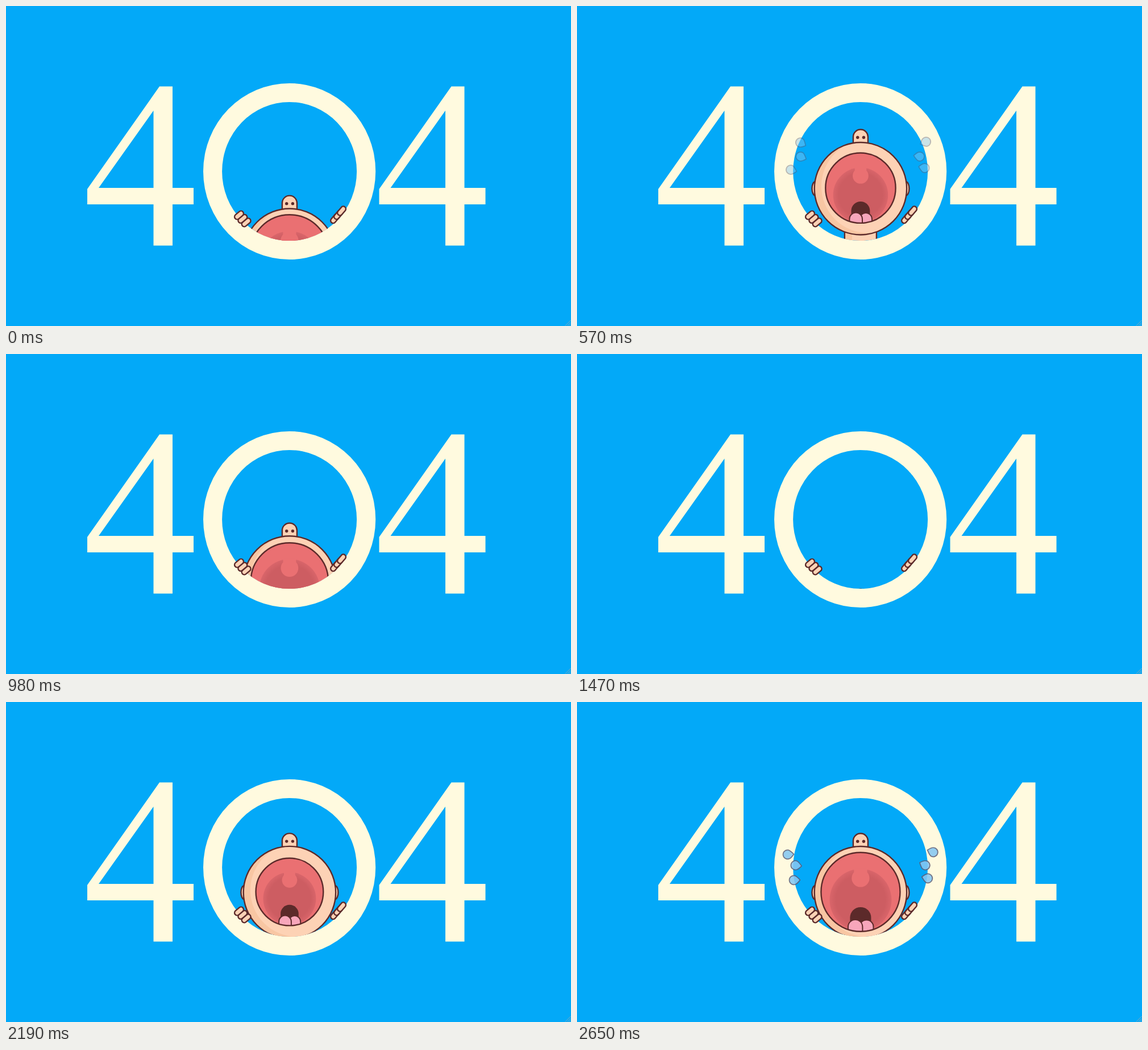
These frames come from a looping animation (994 by 563 pixels, 2.73 s). An HTML page:

```html
<!DOCTYPE html>
<html lang="en">
<head>
<meta charset="utf-8">
<title>404</title>
<style>
  html, body { margin: 0; height: 100%; overflow: hidden; background: #03a9f8; }
  svg { display: block; width: 100vw; height: 100vh; }
  .line { stroke: #5c2a2a; stroke-width: 2.4; }
  .skin { fill: #fdd2b5; }
  .shade { fill: #f8c6a3; }
  .mouth * { vector-effect: non-scaling-stroke; }
</style>
</head>
<body>
<svg viewBox="0 0 994 563" role="img" aria-label="404">
  <defs>
    <clipPath id="hole"><ellipse cx="498.6" cy="291" rx="118.5" ry="122"/></clipPath>
    <clipPath id="face"><circle r="81"/></clipPath>
    <clipPath id="lips"><circle r="60"/></clipPath>
    <radialGradient id="throat">
      <stop offset=".8" stop-color="#cd5d62"/>
      <stop offset="1" stop-color="#d9656a"/>
    </radialGradient>
    <path id="four" fill-rule="evenodd" d="M270 141.500H293V320H330V349H293V421.500H259.500V349H143V322ZM259.500 184L163 320H259.500Z"/>
    <rect id="finger" class="skin line" x="-9" y="-4.500" width="18" height="9" rx="4.500" stroke-width="2"/>
    <path id="drop" d="M10.500 1Q5 7 2 7.700A8 8 0 1 1 2.500 -7.400Q6 -5 10.500 1Z" fill="#86c6f2" stroke="#5f5f78" stroke-width="1.700" stroke-linejoin="round"/>
  </defs>

  <g fill="#fffadf">
    <use href="#four"/>
    <use href="#four" x="513.500"/>
    <path fill-rule="evenodd" d="M347 291a151.600 155 0 1 1 303.200 0a151.600 155 0 1 1 -303.200 0ZM380.100 291a118.500 122 0 1 0 237 0a118.500 122 0 1 0 -237 0Z"/>
  </g>

  <g clip-path="url(#hole)">
    <g id="head">
      <path class="skin line" d="M-28 70V260H28V70"/>
      <path class="shade" d="M-26.800 70V260H-15V70"/>
      <ellipse class="skin line" cx="-80" rx="5.500" ry="12"/>
      <ellipse class="skin line" cx="80" rx="5.500" ry="12"/>
      <path class="skin line" d="M-13 -80V-91a13 13 0 0 1 26 0V-80"/>
      <circle cx="-5.200" cy="-90" r="2.700" fill="#5c2a2a"/>
      <circle cx="5.500" cy="-90" r="2.700" fill="#5c2a2a"/>
      <g clip-path="url(#face)">
        <circle class="shade" r="82"/>
        <circle class="skin" cx="13" cy="-4" r="82"/>
      </g>
      <circle class="line" r="81.200" fill="none"/>
      <g id="mouth" class="mouth">
        <circle r="60" fill="#ea7072"/>
        <g clip-path="url(#lips)">
          <circle cy="12" r="47" fill="url(#throat)"/>
          <path d="M-10 -36H10V-30A13.500 13.500 0 1 1 -10 -30Z" fill="#ea7072"/>
          <path d="M-16 39a16 16 0 0 1 32 0v12h-32Z" fill="#5c2a2a"/>
          <path class="line" d="M-1.500 62V53a10.500 10.500 0 0 1 21 0V62" fill="#f7a6bb" style="stroke-width:2"/>
          <path class="line" d="M-19 62V53a11 11 0 0 1 22 0V62" fill="#f7a6bb" style="stroke-width:2"/>
        </g>
        <circle class="line" r="60" fill="none"/>
      </g>
    </g>
  </g>

  <g id="hands"></g>
  <g id="tears"></g>
  <path d="M984 562.500L993.500 553M988 562.500L993.500 557M991.500 562.500L993.500 560.500" stroke="#86a9bb" fill="none"/>
</svg>
<script>
const $ = id => document.getElementById(id);
const LOOP = 2730, CYCLE = 1800, CX = 498.9;

// Height of the top of the head's tuft, by time within a cycle
const HEIGHT = [[0, 335], [30, 328], [330, 222.5], [380, 222.5], [750, 225.5], [850, 222],
  [870, 228], [980, 296], [1180, 386], [1250, 425], [1430, 425], [1470, 413], [1800, 335]];

// Each tear: x, y relative to the head at 750 ms, speed per 100 ms, angle, turn per 100 ms
const TEARS = [
  [-120, -72, -8, 5, 4, -12], [-111, -51, -3.2, 3, 8, -6], [-119, -26, 2, 4, 0, -6],
  [123, -75, 4.5, 4, 180, 15], [110, -51, 3.5, 3, 195, 6], [116, -29, 2, 4, 188, 0]
];

const clamp = x => Math.max(0, Math.min(1, x));
const ramp = (t, a, b) => clamp((t - a) / (b - a));

function track(keys, t) {
  const i = keys.findIndex(k => k[0] > t);
  const [t0, y0] = keys[i - 1], [t1, y1] = keys[i];
  return y0 + (y1 - y0) * (t - t0) / (t1 - t0);
}

const wave = (t, peak, period) => Math.cos(2 * Math.PI * (t - peak) / period);

function addFingers(x, y, dx, dy, angle) {
  for (let i = 2; i >= 0; i--)
    $('hands').innerHTML += `<use href="#finger" transform="translate(${x + i * dx} ${y + i * dy}) rotate(${angle})"/>`;
}
addFingers(410, 368, 6.3, 6.4, -40);
addFingers(590.5, 360.5, -6, 6.8, -50);
$('tears').innerHTML = TEARS.map(() => '<use href="#drop"/>').join('');

function draw(t) {
  const c = t % CYCLE;
  const shake = 8.5 * wave(t, 380, 92.5) * ramp(c, 290, 340) * (1 - ramp(c, 855, 900));
  const y = track(HEIGHT, c) - shake + 105;
  const mouth = (64.4 + 5.2 * wave(t, 875, CYCLE / 2)) / 60;

  $('head').setAttribute('transform', `translate(${CX} ${y})`);
  $('mouth').setAttribute('transform', `translate(0 -1) scale(${mouth})`);

  $('tears').setAttribute('opacity', 0.88 * ramp(c, 500, 640) * (1 - ramp(c, 860, 960)));
  const s = (c - 750) / 100;
  TEARS.forEach(([x, dy, vx, vy, angle, turn], i) => {
    $('tears').children[i].setAttribute('transform',
      `translate(${CX + x + vx * s} ${y + dy + vy * s}) rotate(${angle + turn * s})`);
  });
}

// The loop rests briefly on its first and last poses
function frame() {
  const t = performance.now() % LOOP;
  draw(t < 120 ? 10 : Math.min(t, 2650));
  requestAnimationFrame(frame);
}
frame();
</script>
</body>
</html>
```
